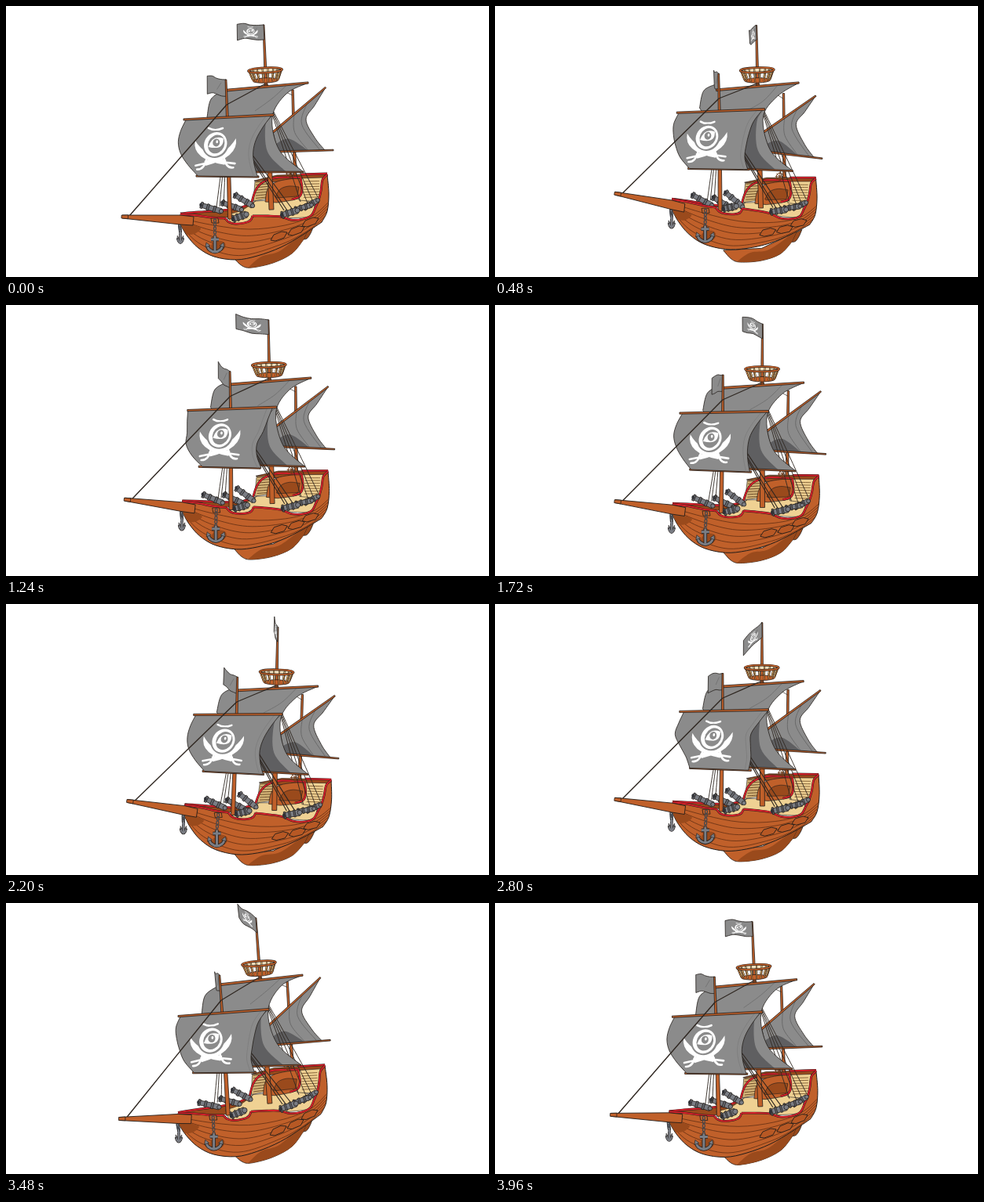
An HTML page with a canvas for the animation above (4 s loop, 615 px wide and 346 px high).

```html
<!DOCTYPE html>
<html lang="en">
<head>
<meta charset="utf-8">
<title>Pirate ship</title>
<style>
html, body { margin: 0; width: 100%; height: 100%; overflow: hidden; background: #fff; }
canvas { display: block; }
</style>
</head>
<body>
<canvas id="stage" width="615" height="346"></canvas>
<script>
const ctx = document.getElementById('stage').getContext('2d');
const LOOP = 4000, STEP = 40, TAU = Math.PI * 2;
const WOOD = '#c0602a', SHADE = '#9a4a1c', RED = '#d81f2a', TAN = '#efd193';
const SAIL = '#8b8b8b', DARK = '#5f5f61', IRON = '#7a7d84', INK = '#231d1a';

// The swell: bow lift, sideways lean, heave and where the top flag streams.
const SWELL = [
  { t: 0, pitch: 0, lean: 0, heave: 0, flagX: -34, flagY: 0 },
  { t: 480, pitch: 0.145, lean: 5, heave: -6, flagX: -9, flagY: 6 },
  { t: 1240, pitch: 0.075, lean: 6, heave: -8.5, flagX: -42, flagY: -5 },
  { t: 2200, pitch: 0.11, lean: 18, heave: 0.5, flagX: -5, flagY: -11 },
  { t: 2800, pitch: 0.093, lean: 12, heave: -4.5, flagX: -23, flagY: 21 },
  { t: 3480, pitch: -0.055, lean: -10, heave: -2.5, flagX: -23, flagY: -18 }
];
let sea, now, flutter;

// Periodic cubic through the swell.
function swellAt(t) {
  const n = SWELL.length, key = k => SWELL[(k + n) % n];
  const time = k => key(k).t + LOOP * Math.floor(k / n);
  let i = n - 1;
  while (SWELL[i].t > t) i--;
  const span = time(i + 1) - time(i), u = (t - time(i)) / span, u2 = u * u, u3 = u2 * u;
  const out = {};
  for (const name in SWELL[0]) {
    const slope = k => (key(k + 1)[name] - key(k - 1)[name]) / (time(k + 1) - time(k - 1)) * span;
    out[name] = key(i)[name] * (2 * u3 - 3 * u2 + 1) + slope(i) * (u3 - 2 * u2 + u)
      + key(i + 1)[name] * (3 * u2 - 2 * u3) + slope(i + 1) * (u3 - u2);
  }
  return out;
}

// Places a point of the resting ship; side runs from -1 (far) to 1 (near).
function at(x, y, side = 0) {
  const { pitch, lean, heave } = sea;
  return [
    x + lean * (330 - y) / 300 + pitch * (312 - x) * 0.17,
    y + heave + pitch * (x - 57 * side - 312 + (270 - y) * 0.12) + lean * 0.14 * side
  ];
}
const run = side => (...c) => {
  const pts = [];
  for (let i = 0; i < c.length; i += 2) pts.push(at(c[i], c[i + 1], side(c[i])));
  return pts;
};
const near = run(x => 0.5 * Math.min(1, Math.max(0, (x - 222) / 70)));
const far = run(x => -Math.min(0.9, Math.max(0, (x - 222) / 100)));
const across = run(x => -0.9 + 1.4 * (x - 316) / 93);
const mid = run(() => 0);

const mix = (a, b, k) => [a[0] + (b[0] - a[0]) * k, a[1] + (b[1] - a[1]) * k];
const move = (p, x, y) => [p[0] + x, p[1] + y];
const corners = pts => pts.map(p => [p]);

// Joins smooth runs of points with straight lines.
function trace(runs, closed) {
  ctx.beginPath();
  runs.forEach((p, r) => {
    if (r) ctx.lineTo(...p[0]); else ctx.moveTo(...p[0]);
    for (let i = 0; i < p.length - 1; i++) {
      const a = p[i - 1] || p[i], b = p[i], c = p[i + 1], d = p[i + 2] || c;
      ctx.bezierCurveTo(b[0] + (c[0] - a[0]) / 6, b[1] + (c[1] - a[1]) / 6,
        c[0] - (d[0] - b[0]) / 6, c[1] - (d[1] - b[1]) / 6, c[0], c[1]);
    }
  });
  if (closed) ctx.closePath();
}
function shape(fill, runs, width = 0.8) {
  trace(runs, true);
  ctx.fillStyle = fill;
  ctx.fill();
  if (width) { ctx.strokeStyle = INK; ctx.lineWidth = width; ctx.stroke(); }
}
function line(color, width, pts) {
  trace([pts], false);
  ctx.strokeStyle = color;
  ctx.lineWidth = width;
  ctx.stroke();
}
function inside(outline, paint) {
  ctx.save();
  trace(outline, true);
  ctx.clip();
  paint();
  ctx.restore();
}
function ellipse(p, rx, ry, fill, stroke, width = 0.8, turn = 0) {
  ctx.beginPath();
  ctx.ellipse(p[0], p[1], rx, ry, turn, 0, TAU);
  if (fill) { ctx.fillStyle = fill; ctx.fill(); }
  if (stroke) { ctx.strokeStyle = stroke; ctx.lineWidth = width; ctx.stroke(); }
}
const rope = (a, b, width = 0.9) => line('#2f2721', width, [a, b]);
function rail(pts) {
  line(INK, 2.8, pts);
  line(RED, 1.9, pts);
}
function spar(a, b, w0, w1, fill = WOOD) {
  const len = Math.hypot(b[0] - a[0], b[1] - a[1]) || 1;
  const nx = (a[1] - b[1]) / len / 2, ny = (b[0] - a[0]) / len / 2;
  shape(fill, corners([move(a, nx * w0, ny * w0), move(b, nx * w1, ny * w1),
    move(b, -nx * w1, -ny * w1), move(a, -nx * w0, -ny * w0)]), 0.8);
}
function cannon([a, b], w = 7) {
  spar(a, b, w * 0.8, w, IRON);
  for (const k of [0, 0.3, 0.62]) spar(mix(a, b, k), mix(a, b, k + 0.1), w + 1, w + 1, '#666970');
  ellipse(b, w * 0.38, w * 0.38, IRON, INK);
  ellipse(a, w * 0.25, w * 0.36, '#303136');
}

function drawAnchor(hook, c, s, narrow) {
  for (let i = 0; i <= 4; i++) ellipse(mix(hook, move(c, 0, -9 * s), i / 4), 1.5, 2.2, null, '#44474d', 1.2);
  const q = (x, y) => move(c, x * s * narrow, y * s);
  for (const [color, w] of [[INK, 4.6], [IRON, 3]]) {
    line(color, w * s, [q(0, -9), q(0, 10)]);
    line(color, w * s, [q(-5, -5), q(5, -5)]);
    line(color, w * s, [q(-10, 3), q(-7, 8), q(0, 11), q(7, 8), q(10, 3)]);
  }
  for (const d of [-1, 1]) shape(IRON, corners([q(d * 11, -1), q(d * 12, 5), q(d * 6, 3)]), 0.6);
}

// Eye over crossed cutlasses, drawn 54 units wide and high.
function emblem(o, ux, uy) {
  ctx.save();
  ctx.transform(ux[0] / 27, ux[1] / 27, uy[0] / 54, uy[1] / 54, o[0], o[1]);
  ctx.fillStyle = ctx.strokeStyle = '#fff';
  ctx.lineCap = 'round';
  ctx.lineWidth = 2.6;
  for (const s of [-1, 1]) {
    ctx.beginPath();
    ctx.moveTo(s * 26, 16);
    ctx.quadraticCurveTo(s * 30, 40, -s * 12, 49);
    ctx.lineTo(-s * 14, 43);
    ctx.quadraticCurveTo(s * 14, 36, s * 26, 16);
    ctx.fill();
    ctx.beginPath();
    ctx.moveTo(-s * 11, 40);
    ctx.quadraticCurveTo(-s * 14, 54, -s * 23, 53);
    ctx.moveTo(-s * 14, 46);
    ctx.lineTo(-s * 25, 48);
    ctx.stroke();
  }
  ctx.beginPath();
  ctx.moveTo(-9, 1);
  ctx.quadraticCurveTo(-1, 6, 9, 2);
  ctx.stroke();
  ellipse([0, 22], 17, 17.5, SAIL);
  ellipse([0, 22], 14.5, 15.5, '#fff', null, 0, 0.4);
  ellipse([1, 22], 10.5, 12, SAIL, null, 0, 0.4);
  ctx.beginPath();
  ctx.moveTo(-9, 25);
  ctx.quadraticCurveTo(-4, 9, 10, 15);
  ctx.quadraticCurveTo(11, 31, -9, 25);
  ctx.fillStyle = '#fff';
  ctx.fill();
  ellipse([1, 20], 4.5, 5, SAIL);
  ellipse([2, 19], 1.4, 2, '#fff');
  ctx.restore();
}

// A flag that ripples from its pole edge towards the tail.
function flag(top, low, tail) {
  const edge = (from, lag) => [0, 0.25, 0.5, 0.75, 1].map(k => {
    const wave = Math.sin(k * 6 - now / LOOP * TAU * 4 + lag) * 2.4 * k;
    return move(from, tail[0] * k - wave * 0.3, tail[1] * k + wave);
  });
  const upper = edge(top, 0), lower = edge(low, 0.7).reverse();
  shape(SAIL, [upper, lower]);
  line('#666', 0.6, [mix(upper[1], lower[3], 0.2), mix(upper[2], lower[2], 0.7)]);
}

function drawInside() {
  shape(SHADE, [far(222,265, 245,263, 275,261, 300,257, 318,249), near(318,268, 262,271)], 0.7);
  shape(TAN, [far(282,266, 300,261, 318,249), across(374,246), near(393,252, 388,268, 350,271, 312,272, 306,279, 286,277)], 0.6);
  rail(far(222,265, 245,263, 275,261, 300,257, 314,250));
  shape(SHADE, corners(across(316,223, 345,216, 409,214, 404,224, 375,223, 335,225)), 0.7);
  shape(TAN, corners(across(374,220, 403,219, 398,250, 373,248)), 0.6);
  shape('#d5b578', corners(across(317,224, 337,221, 333,246, 315,249)), 0.6);
  for (let y = 225; y < 247; y += 3.4) {
    line('#6b4a27', 1, across(318,y, 334,y - 1.5));
    line('#7b582f', 0.9, across(379,y - 1, 399,y - 1.5));
  }
  shape(WOOD, [across(330,250, 333,234, 343,225, 360,221, 375,220), across(377,236, 371,246, 345,251)], 0.7);
  shape(SHADE, [across(343,244, 349,234, 360,230, 373,231), across(371,243, 345,245)], 0.6);
  rail(across(313,250, 318,235, 327,225, 345,219, 375,219));
  rail(across(375,219, 377,234, 374,243, 364,247));
  rail(across(375,215, 409,214));
  const [wheel] = across(362,214);
  ellipse(wheel, 4.5, 4.5, null, '#6d3a19', 1);
  for (let a = 0; a < Math.PI; a += Math.PI / 4) {
    const x = Math.cos(a) * 6, y = Math.sin(a) * 6;
    line('#6d3a19', 0.9, [move(wheel, -x, -y), move(wheel, x, y)]);
  }
  cannon(far(248,254, 274,262));
  cannon(far(275,251, 300,260));
  cannon(far(291,241, 314,255));
}

function drawMizzen() {
  const [head, foot, throat, peak, heel, clew, end, luff] =
    mid(365,107, 368,216, 340,161, 407,104, 346,186, 406,184, 417,184, 382,145);
  spar(head, foot, 2.4, 3.6);
  const outline = [[throat, peak], [peak, mix(peak, luff, 0.55), luff, move(mix(luff, clew, 0.6), -3, 0), clew], [heel]];
  shape(SAIL, outline);
  inside(outline, () => {
    shape(DARK, [[mix(throat, heel, 0.6), mix(heel, luff, 0.4), mix(heel, clew, 0.65)], [heel]], 0);
    for (const k of [0.4, 0.65]) line('#626262', 0.8, [mix(throat, peak, k), mix(heel, luff, k + 0.2), mix(heel, clew, k + 0.25)]);
  });
  spar(heel, end, 2.2, 1.6);
  spar(throat, peak, 2.4, 1.8);
  rope(...mid(350,107, 365,114), 0.7);
}

function drawNest() {
  const [c, foot] = mid(330,81, 338,260);
  ctx.save();
  ctx.translate(...c);
  ctx.rotate(-Math.atan2(foot[0] - c[0], foot[1] - c[1]));
  ellipse([0, 1], 20, 3, '#f3e2c0');
  ellipse([0, 14], 16.5, 3.2, WOOD, INK);
  for (let i = 0; i < 18; i++) {
    const x = Math.cos(i * TAU / 18), y = Math.sin(i * TAU / 18) * 3;
    const post = [[x * 21, y + 1], [x * 16.5, y + 13]];
    line(INK, 2, post);
    line(y < 0 ? '#d9b272' : '#c9803f', 1.1, post);
  }
  ellipse([0, 1], 21.5, 3.2, null, INK, 2.8);
  ellipse([0, 1], 21.5, 3.2, null, WOOD, 1.5);
  ctx.restore();
}

function drawMain() {
  const [top, hounds, foot] = mid(328,24, 331,100, 338,260);
  spar(hounds, foot, 4.5, 6);
  spar(top, hounds, 1.8, 3.4);
  const [start] = mid(333,120);
  for (const p of near(375,250, 384,252, 391,250, 397,244)) rope(start, p);

  const left = at(277, 108, -1), right = at(385, 98, 1);
  const [clew] = run(() => 0.8)(379, 212), tack = at(306, 212, -0.2);
  const [bend, waist, skirt] = mid(357,112, 339,142, 348,184);
  const sway = p => move(p, flutter * Math.sin(p[1] / 9), 0);
  const outline = [[left, right], [right, bend, sway(waist), sway(skirt), clew], [tack],
    mid(256,142, 261,119, 277,108)];
  shape(SAIL, outline);
  inside(outline, () => {
    const [seam, fold] = mid(331,148, 333,186);
    shape(DARK, [[at(341, 139, 1), seam, fold, mix(tack, clew, 0.7)], [tack], mid(300,175)], 0);
    line('#6c6c6c', 0.8, [mix(left, right, 0.75), move(bend, -18, 6), move(waist, -22, -8)]);
  });
  spar(tack, clew, 1.8, 1.6);
  spar(left, right, 2.8, 2.2);
  drawNest();
  flagOnTop(top, mix(top, foot, 0.08));
}

function flagOnTop(top, low) {
  const tail = [sea.flagX, sea.flagY], uy = [(low[0] - top[0]) * 0.75, (low[1] - top[1]) * 0.75];
  flag(top, low, tail);
  const c = move(mix(top, low, 0.5), tail[0] / 2, tail[1] / 2);
  emblem(move(c, -uy[0] / 2, -uy[1] / 2), [-tail[0] * 0.28, -tail[1] * 0.28], uy);
}

function drawFore() {
  const [top, foot, hounds, cross] = mid(280,94, 285,272, 281,126, 282,147);
  for (const p of far(268,257, 272,256, 277,255)) rope(cross, p);
  for (const p of near(354,261, 360,264, 368,264)) rope(cross, p, 1.1);
  spar(cross, foot, 3.6, 5);
  const beat = now / 1000 * TAU;
  flag(top, mix(top, foot, 0.12), [-15 - 9 * Math.cos(beat), -4 - 6 * Math.sin(beat)]);
  spar(top, cross, 1.8, 3);

  const left = at(226, 145, -1), right = at(341, 139, 1);
  const lowL = at(242, 217, -0.75), lowR = at(322, 218, 0.75);
  const belly = 17 - 2 * flutter;
  const cloth = (s, v) => move(mix(mix(left, right, s), mix(lowL, lowR, s), v),
    -belly * (1 - s * 0.2) * Math.sin(v * Math.PI) + flutter * Math.sin(v * 9 - beat), 0);
  const down = [0, 0.2, 0.4, 0.6, 0.8, 1];
  spar(lowL, lowR, 2.2, 2.2);
  shape(SAIL, [down.map(v => cloth(0.03, v)), down.map(v => cloth(0.98, 1 - v))]);
  line('#777', 0.6, down.map(v => cloth(0.92, v)));
  const crown = cloth(0.42, 0.16), base = cloth(0.38, 0.88);
  const tilt = [(right[0] - left[0]) * 0.235, (right[1] - left[1]) * 0.235];
  emblem(crown, tilt, [base[0] - crown[0], base[1] - crown[1]]);
  spar(left, right, 2.2, 2.6);
  const [bowEnd, mast] = mid(157,268, 329,100);
  rope(bowEnd, hounds, 1.4);
  rope(hounds, mast, 1.2);
}

function drawHull() {
  shape(SHADE, [mid(377,290, 377,297, 383,297, 388,290, 392,280)]);
  const keel = [mid(290,322, 301,332, 313,334, 340,328, 364,316, 379,298), mid(385,284, 340,312)];
  shape(WOOD, keel);
  inside(keel, () => shape(SHADE, [mid(306,336, 325,320, 350,312, 385,282), mid(385,300, 340,336)], 0));

  const rim = [near(222,266, 240,267, 262,270, 279,271), near(279,271, 284,276, 292,278, 303,277, 311,274, 314,268),
    near(314,268, 334,268, 350,269, 363,273, 378,272, 389,267, 394,257), near(394,257, 398,248, 401,236, 403,222, 409,215)];
  const side = [...rim, near(409,215, 411,240, 409,262, 402,276),
    near(402,276, 378,292, 350,308, 320,319, 293,324, 265,320, 245,309, 231,294, 222,279)];
  shape(WOOD, side, 1);
  inside(side, () => {
    const sheer = [222,271, 265,280, 310,285, 355,280, 390,268, 411,250];
    const base = [222,282, 245,311, 293,327, 350,310, 385,290, 406,272];
    for (let k = 0; k < 5; k++) line('#5b2b12', 0.75, near(...sheer.map((v, i) => v + (base[i] - v) * k / 5)));
    shape(SHADE, [near(222,279, 238,280, 248,284, 240,291, 230,292)], 0);
  });
  for (const [x, y] of [[347, 294], [369, 287], [387, 276]]) {
    shape('#b75824', corners(near(x - 10,y + 5, x - 6,y - 2, x + 4,y - 6, x + 11,y - 5, x + 7,y + 2, x - 4,y + 6)), 0.9);
  }
  rim.forEach(rail);
  cannon(near(379,258, 397,248), 6.5);
  cannon(near(368,260, 389,254), 6.5);
  cannon(near(351,267, 371,261), 8);
  cannon(near(289,272, 306,266), 8.5);
}

function drawBow() {
  const [tip, seat, head, root, chin, farHook, farAnchor, hook, anchor] =
    mid(148,269, 222,267, 239,269, 238,280, 222,279, 221,280, 222,294, 266,274, 266,303);
  drawAnchor(farHook, farAnchor, 0.75, 0.45);
  shape(WOOD, corners([move(tip, 0, -2), seat, head, root, chin, move(tip, 0, 2)]), 0.9);
  spar(move(tip, -1, 0), mix(tip, mix(seat, chin, 0.4), 0.1), 3.8, 4.8);
  shape(WOOD, corners([move(hook, -5, -3), move(hook, 4, -3), move(hook, 5, 3), move(hook, -4, 3)]));
  ellipse(move(anchor, 4, 4), 10, 7, SHADE, null, 0, -0.3);
  drawAnchor(hook, anchor, 1, 1);
}

function frame() {
  now = Math.floor(performance.now() / STEP) * STEP % LOOP;
  sea = swellAt(now);
  flutter = 3 * Math.sin(now / LOOP * TAU) ** 2;
  ctx.fillStyle = '#fff';
  ctx.fillRect(0, 0, 615, 346);
  ctx.lineJoin = 'round';
  drawInside();
  drawMizzen();
  drawMain();
  drawFore();
  drawHull();
  drawBow();
  requestAnimationFrame(frame);
}
frame();
</script>
</body>
</html>
```
